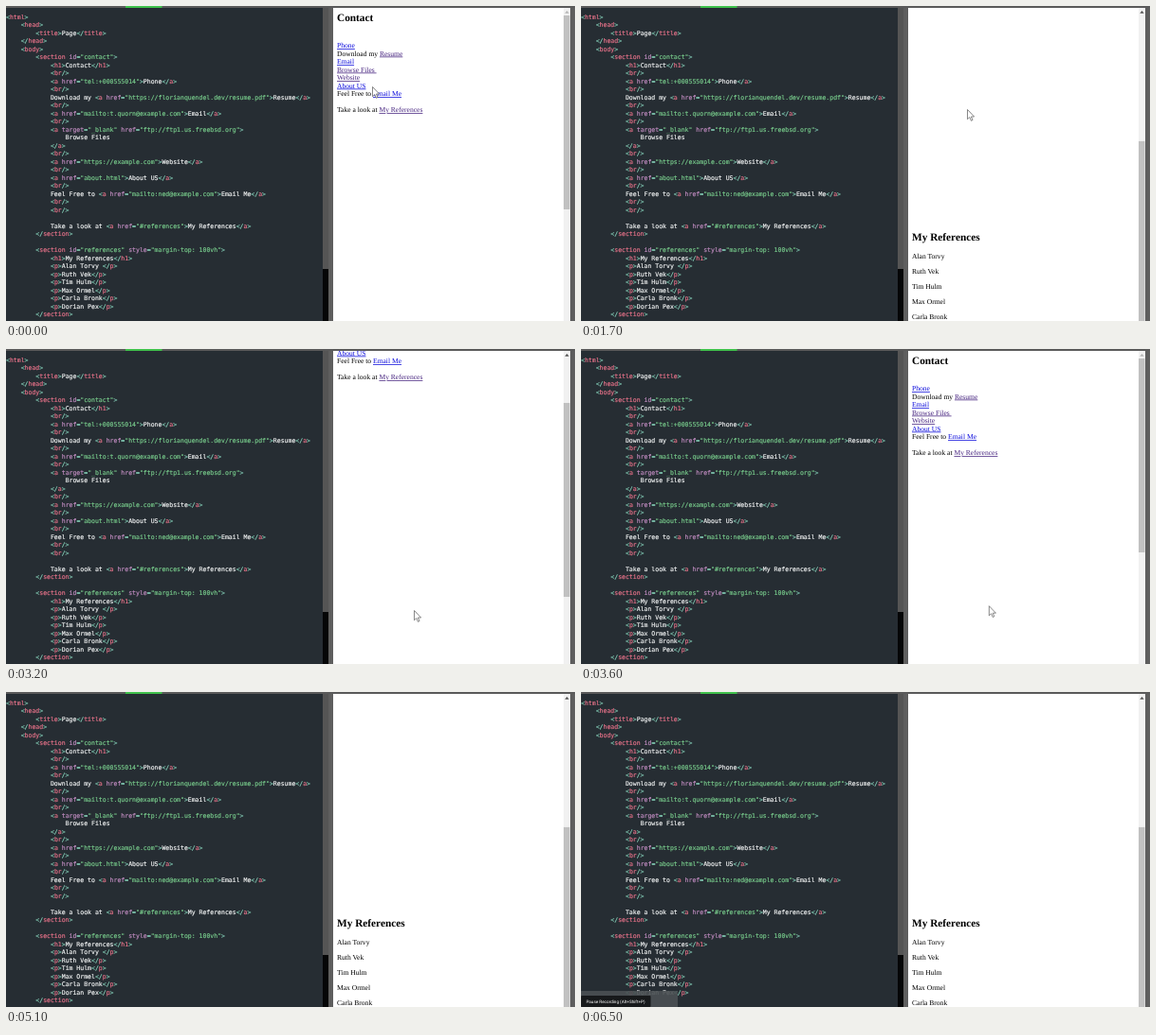
Write an HTML page that moves like this. It is 600x333 px and loops after 6.6 s.

```html
<!DOCTYPE html>
<html lang="en">
<head>
<meta charset="utf-8">
<title>Contact page demo</title>
<style>
  html, body { margin: 0; height: 100%; overflow: hidden; background: #262d33; }
  svg { display: block; width: 100vw; height: 100vh; }
  text { white-space: pre; text-rendering: geometricPrecision; }
  #code { font: 6.5px "DejaVu Sans Mono", monospace; color: #f4f6f6; }
  #code text, #code tspan { fill: currentColor; stroke: currentColor; stroke-width: .16px; }
  .mark { color: #8ad9c0; }
  .tag { color: #e8738a; }
  .attr { color: #c08cc0; }
  .str { color: #78cc8c; }
  #page { font: 7.57px "Liberation Serif", serif; }
  #page .title { font-size: 11.3px; font-weight: bold; }
  .link { fill: #0c0cdc; text-decoration: underline; text-decoration-thickness: .5px; }
  .visited { fill: #482680; }
  .link.active { fill: #c4143c; }
  #tip text { font: 4.6px Roboto, sans-serif; fill: #fff; }
</style>
</head>
<body>
<svg viewBox="0 0 600 333">
  <clipPath id="view"><rect x="345" y="2" width="243" height="331"/></clipPath>
  <rect width="600" height="333" fill="#262d33"/>
  <g id="code"></g>
  <rect x="334" y="2" width="6" height="276" fill="#555"/>
  <rect x="334" y="278" width="6" height="55" fill="#050607"/>
  <g id="tip">
    <rect y="316" width="102" height="17" fill="#4b5054" opacity=".9"/>
    <rect y="321" width="73.5" height="12" rx="1" fill="#17191b"/>
    <text x="5.5" y="329.3">Pause Recording (Alt+Shift+P)</text>
  </g>
  <rect x="340" width="260" height="333" fill="#5e5e5e"/>
  <rect x="345" y="2" width="243" height="331" fill="#fff"/>
  <g clip-path="url(#view)"><g id="page"></g></g>
  <rect x="588" y="2" width="7" height="331" fill="#f1f1f1"/>
  <path id="up" d="M589.3 7.7l2.2-2.8 2.2 2.8z"/>
  <rect id="thumb" x="588" y="10" width="6.5" height="205" fill="#c1c1c1"/>
  <rect width="600" height="2" fill="#5a5a5a"/>
  <rect x="126" width="38.5" height="2" fill="#3fc14b"/>
  <g id="ring" fill="none">
    <circle r="15" stroke="#cb5a6e" stroke-width="2"/>
    <circle r="14.3" stroke="#f0c8cf" stroke-width=".5"/>
  </g>
  <g id="cursor" fill="#fff" stroke="#555" stroke-width=".7" stroke-linejoin="round">
    <path id="arrow" d="M0 0V10.2L2.3 8.1 3.9 11.8 5.5 11.1 3.9 7.5H7.1Z"/>
    <path id="hand" d="M-.9 .6Q0-.5 .9 .6V4L4.2 4.6Q5.3 5 5.2 6.3L4.5 10.8H-.6L-3 7.3Q-3.3 5.8-2 6L-.9 7Z"/>
  </g>
</svg>
<script>
const $ = id => document.getElementById(id);
const LOOP = 6600, STEP = 100, CHAR = 3.914, LINE = 8.51;
const people = ["Alan Torvy", "Ruth Vek", "Tim Hulm", "Max Ormel", "Carla Bronk", "Dorian Pex"];

const source = `<html>
    <head>
        <title>Page</title>
    </head>
    <body>
        <section id="contact">
            <h1>Contact</h1>
            <br/>
            <a href="tel:+000555014">Phone</a>
            <br/>
            Download my <a href="https://florianquendel.dev/resume.pdf">Resume</a>
            <br/>
            <a href="mailto:t.quorn@example.com">Email</a>
            <br/>
            <a target="_blank" href="ftp://ftp1.us.freebsd.org">
                Browse Files
            </a>
            <br/>
            <a href="https://example.com">Website</a>
            <br/>
            <a href="about.html">About US</a>
            <br/>
            Feel Free to <a href="mailto:ned@example.com">Email Me</a>
            <br/>
            <br/>

            Take a look at <a href="#references">My References</a>
        </section>

        <section id="references" style="margin-top: 100vh">
            <h1>My References</h1>
${people.map((name, i) => `            <p>${name}${i ? "" : " "}</p>`).join("\n")}
        </section>`;

const span = (cls, s) => s ? `<tspan class="${cls}">${s.replace(/</g, "&lt;").replace(/>/g, "&gt;")}</tspan>` : "";
const text = (x, y, body, cls = "") => `<text x="${x}" y="${y}" class="${cls}">${body}</text>`;

const highlight = line => line.replace(/<[^>]+>/g, tag =>
  tag.replace(/(".*?")|(<\/?)(\w+)|([\w-]+)(?==)|(\/?>|=)/g, (_, str, open, name, attr, mark) =>
    span("str", str) + span("mark", open) + span("tag", name) + span("attr", attr) + span("mark", mark)));

$("code").innerHTML = source.split("\n").map((line, i) => {
  const code = line.trimStart();
  return text((line.length - code.length) * CHAR, 13.6 + i * LINE, highlight(code));
}).join("");

// Row on the page, plain text, link text, visited
const rows = [
  [0, "", "Phone"], [1, "Download my ", "Resume", true], [2, "", "Email"],
  [3, "", "Browse Files ", true], [4, "", "Website", true], [5, "", "About US"],
  [6, "Feel Free to ", "Email Me"], [8, "Take a look at ", "My References", true]
];
$("page").innerHTML = text(349, 16.4, "Contact", "title") +
  rows.map(([row, plain, link, seen]) =>
    text(349, 44 + row * 8.5, plain + span(seen ? "link visited" : "link", link))).join("") +
  text(349, 473.6, "My References", "title") +
  people.map((name, i) => text(349, 493 + i * 16.1, name)).join("");
const refLink = [...document.querySelectorAll(".link")].pop();

// Keys: time, then values
const scrollKeys = [[0, 0], [1400, 0], [1500, 226], [2600, 226], [2900, 132], [3100, 132],
  [3200, 80], [3400, 0], [4500, 0], [4600, 226]];
const cursorKeys = [[0, 386.5, 85.5], [300, 396, 96], [700, 423, 112], [900, 407.5, 109.5],
  [1900, 407.5, 109.5], [2200, 425, 190], [2500, 440, 275], [2700, 440, 275], [2900, 430.5, 276.5],
  [3500, 430.5, 276.5], [3800, 430, 262], [3900, 430, 190], [4000, 430, 128], [4100, 429, 108.5],
  [4800, 429, 108.5], [4900, 405, 170], [5000, 350, 270], [5100, 290, 350]];
const clicks = [[1400, 300], [4500, 200]];

function sample(keys, t) {
  const next = keys.findIndex(k => k[0] > t);
  if (next < 0) return keys[keys.length - 1].slice(1);
  const a = keys[next - 1], b = keys[next], f = (t - a[0]) / (b[0] - a[0]);
  return a.slice(1).map((v, i) => v + (b[i + 1] - v) * f);
}

const move = (id, x, y) => $(id).setAttribute("transform", `translate(${x} ${y})`);
const show = (id, opacity) => $(id).setAttribute("opacity", opacity);

function frame(now) {
  const t = Math.floor(now % LOOP / STEP) * STEP;
  const [scroll] = sample(scrollKeys, t), [x, y] = sample(cursorKeys, t);
  const overLink = scroll === 0 && x > 393 && x < 440 && y > 105 && y < 114;
  const click = clicks.find(([start, length]) => t >= start && t < start + length);

  move("page", 0, -scroll);
  move("thumb", 0, scroll * .588);
  move("cursor", x, y);
  move("ring", x - .5, y - .5);
  $("up").setAttribute("fill", scroll ? "#505050" : "#b4b4b4");
  show("arrow", overLink ? 0 : 1);
  show("hand", overLink ? 1 : 0);
  show("ring", click ? 1 - (t - click[0]) / click[1] : 0);
  show("tip", Math.min(1, Math.max(0, (t - 5800) / 500)));
  refLink.classList.toggle("active", !!click && scroll === 0);
  requestAnimationFrame(frame);
}
frame(performance.now());
</script>
</body>
</html>
```
